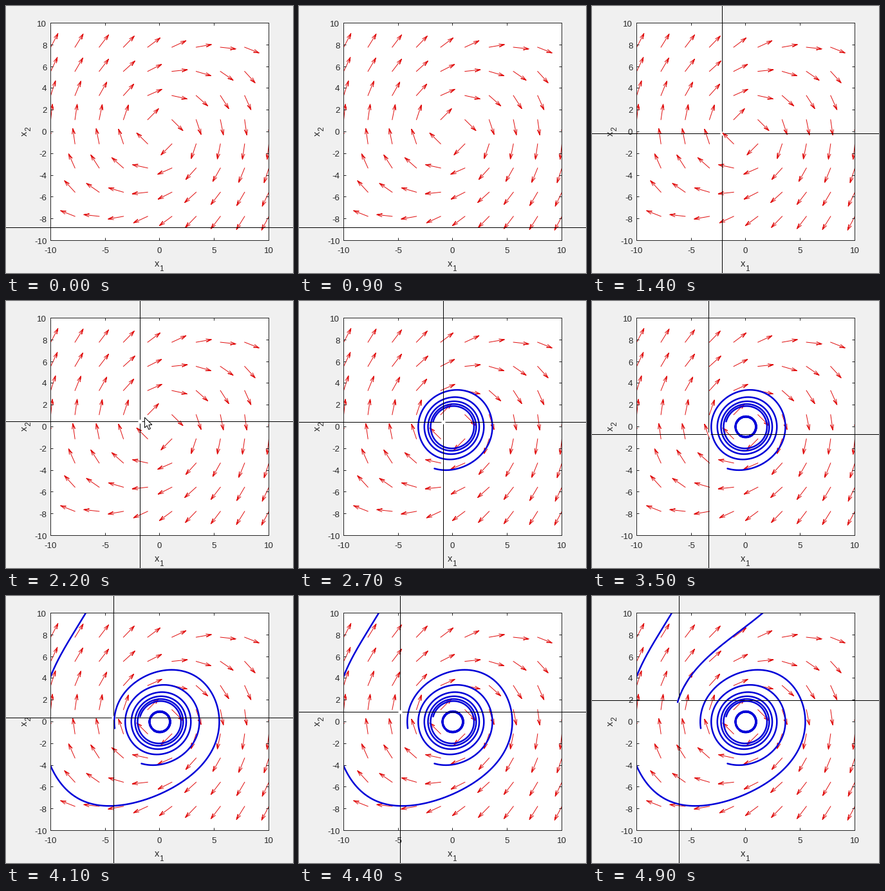
A matplotlib script that plays this animation: 446x415 px, repeating every 5 s.

```python
import math

import numpy as np
import matplotlib.pyplot as plt
from matplotlib.animation import FuncAnimation
from matplotlib.patches import Polygon, Rectangle

W, H, DPI = 446, 415, 64
PX = 72 / DPI  # points per pixel
LEFT, RIGHT, TOP, BOTTOM = 69.5, 408.5, 26.5, 364.5
INK, RED, BLUE = "#262626", "#e01010", "#0000d8"
FONT = "Liberation Sans"
STEP_MS, LOOP_MS = 100, 5000
REDRAW = 1.57  # steps between redraws of the pointer

# time, x, y of the crosshair at each turn
TURNS = np.array([
    (800, 560, 344), (1400, 202, 198), (1900, 208, 187), (2200, 208, 187),
    (2800, 225, 188), (3100, 230, 200), (3500, 181, 207), (4100, 167, 189),
    (4900, 135, 162),
])
# time each path appears, starting point
CLICKS = [(2400, (-1.8, 0.48)), (3000, (-0.8, 0.4)),
          (3900, (-4.13, -0.6)), (4800, (-6.25, 1.8))]
BUSY = (2100, 2400)


def to_px(x, y):
    return (LEFT + (np.asarray(x) + 10) * (RIGHT - LEFT) / 20,
            BOTTOM - (np.asarray(y) + 10) * (BOTTOM - TOP) / 20)


def field(p):
    x, y = p
    return np.array([y, -x + 0.01 * y ** 3])


def trajectory(start, span=30, h=0.01):
    """Runge-Kutta path, stopped once it has left the plot for good."""
    p = np.array(start, float)
    path = [p]
    for _ in range(round(span / h)):
        k1 = field(p)
        k2 = field(p + h / 2 * k1)
        k3 = field(p + h / 2 * k2)
        k4 = field(p + h * k3)
        p = p + h / 6 * (k1 + 2 * k2 + 2 * k3 + k4)
        path.append(p)
        if abs(p[1]) > 11:
            break
    return to_px(*np.array(path).T)


def pointer(i):
    """Crosshair position, eased between turns and held between redraws."""
    k = math.ceil((i + 1 - 21) / REDRAW) - 1
    t = STEP_MS * math.floor(21 + k * REDRAW)
    t = np.clip(t, TURNS[0, 0], TURNS[-1, 0])
    n = min(np.searchsorted(TURNS[:, 0], t, side="right"), len(TURNS) - 1)
    a, b = TURNS[n - 1], TURNS[n]
    s = (t - a[0]) / (b[0] - a[0])
    s = s * s * (3 - 2 * s)
    return np.round(a[1:] + (b - a)[1:] * s) + 0.5


fig = plt.figure(figsize=(W / DPI, H / DPI), dpi=DPI, facecolor="#f0f0f0")
ax = fig.add_axes([0, 0, 1, 1])
ax.set_xlim(0, W)
ax.set_ylim(H, 0)
ax.axis("off")

frame = Rectangle((LEFT, TOP), RIGHT - LEFT, BOTTOM - TOP, fc="white", ec="none",
                  zorder=0, snap=False)
ax.add_patch(frame)


def stroke(xs, ys, color=INK, width=1, clip=False, **kw):
    line, = ax.plot(xs, ys, color=color, lw=width * PX, snap=False, **kw)
    if clip:
        line.set_clip_path(frame)
    return line


def label(x, y, s, size=13.3, ha="center", va="baseline", **kw):
    ax.text(x, y, s, fontsize=size * PX, family=FONT, color=INK, ha=ha, va=va, **kw)


def draw_axes(tick=3.5):
    stroke([LEFT, RIGHT, RIGHT, LEFT, LEFT], [TOP, TOP, BOTTOM, BOTTOM, TOP], zorder=3)
    for v in range(-10, 11, 5):
        x = round(float(to_px(v, 0)[0]) - 0.5) + 0.5
        for edge, d in ((TOP, tick), (BOTTOM, -tick)):
            stroke([x, x], [edge, edge + d], zorder=3)
        label(x - 0.5, 384, str(v))
    for v in range(-10, 11, 2):
        y = round(float(to_px(0, v)[1]) - 0.5) + 0.5
        for edge, d in ((LEFT, tick), (RIGHT, -tick)):
            stroke([edge, edge + d], [y, y], zorder=3)
        label(63.3, y + 5, str(v), ha="right")
    label(231, 405, "x", 14.7, "left")
    label(238.5, 412, "1", 11.7, "left")
    label(35.5, 202.5, "x", 14.7, "right", "bottom", rotation=90)
    label(41, 193.5, "2", 11.7, "right", "bottom", rotation=90)


def draw_arrows(length=24, head=8, half=2.3):
    points = []
    grid = np.linspace(-10, 10, 10)
    for gx in grid:
        for gy in grid[1:-1]:
            tail = np.array(to_px(gx, gy))
            u = field((gx, gy)) * (1, -1)
            u = u / np.hypot(*u)
            side = half * np.array([-u[1], u[0]])
            tip = tail + length * u
            back = tip - head * u
            points += [tail, tip, back + side, tip, back - side, (np.nan, np.nan)]
    stroke(*np.array(points).T, RED, clip=True, zorder=2)


draw_axes()
draw_arrows()

paths = [(t, stroke(*trajectory(p), BLUE, 2.5, clip=True, zorder=4,
                    solid_joinstyle="round", solid_capstyle="round"))
         for t, p in CLICKS]
cross = [stroke([], [], "black", zorder=6, solid_capstyle="butt") for _ in range(4)]

ARROW = np.array([(0, 0), (0, 16), (3.7, 12.6), (6.3, 18.6), (8.9, 17.5),
                  (6.4, 11.6), (11.4, 11.4)])
cursor = Polygon(ARROW + (215.5, 181), fc="white", ec="black", lw=PX, zorder=7)
ax.add_patch(cursor)


def update(i, gap=3):
    t = i * STEP_MS
    x, y = pointer(i)
    west, east, north, south = cross
    west.set_data([0, x - gap], [y, y])
    east.set_data([x + gap, max(W, x + gap)], [y, y])
    north.set_data([x, x], [0, y - gap])
    south.set_data([x, x], [y + gap, H])
    for start, line in paths:
        line.set_visible(t >= start)
    cursor.set_visible(BUSY[0] <= t < BUSY[1])
    return cross + [cursor] + [line for _, line in paths]


anim = FuncAnimation(fig, update, frames=LOOP_MS // STEP_MS, interval=STEP_MS,
                     repeat=True, repeat_delay=0)
plt.show()
```
